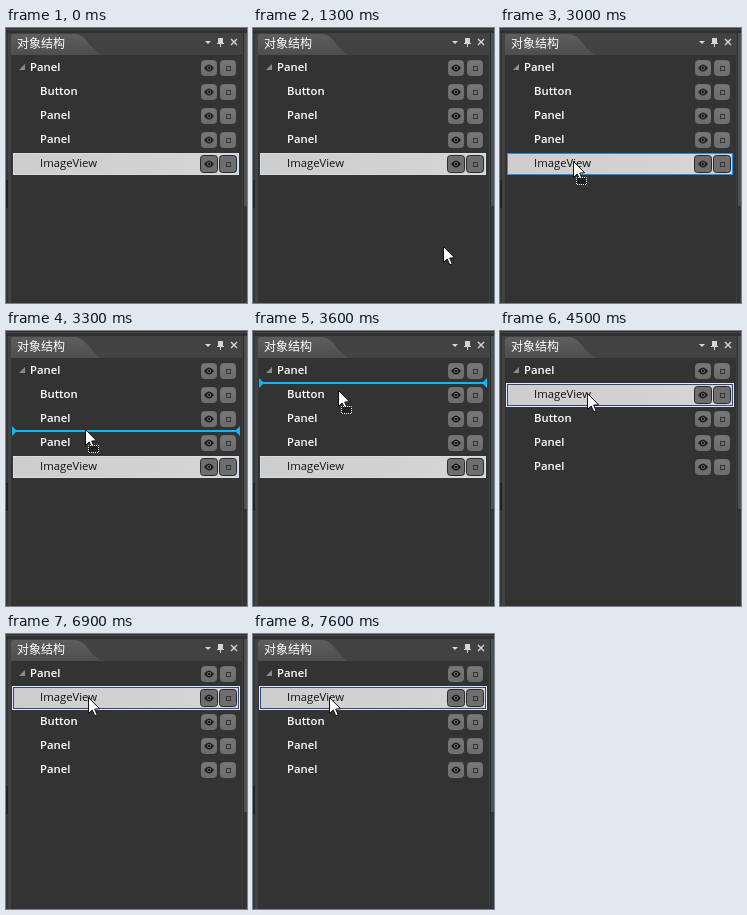
Animation of 241x275 px, one loop 8000 ms. Source, as an HTML page with a canvas:

```html
<!DOCTYPE html>
<html lang="zh">
<head>
<meta charset="utf-8">
<title>对象结构</title>
<style>
html, body { margin: 0; width: 100%; height: 100%; overflow: hidden; background: #333; }
canvas { display: block; width: 241px; height: 275px; }
</style>
</head>
<body>
<canvas id="stage" width="241" height="275"></canvas>
<script>
const ctx = document.getElementById('stage').getContext('2d');
const LOOP = 8000, STEP = 100;
const LEFT = 6, RIGHT = 234, FIRST = 28, ROW = 24;
const DRAG_START = 3000, DROP = 4000, HOVER = 2000;

// time, x, y of the pointer tip
const path = [
  [500, 231, 246], [700, 231, 246], [900, 223, 240], [1000, 223, 240],
  [1300, 190, 218], [1600, 138, 178], [1900, 98, 148], [2000, 88, 146],
  [2300, 75, 135], [2900, 75, 135], [3000, 73, 133], [3300, 79, 98],
  [3600, 85, 59], [4300, 85, 59], [4500, 87, 62], [6200, 87, 62],
  [6300, 93, 63], [6600, 131, 63], [6700, 131, 63], [7100, 32, 63],
  [7300, 32, 63], [7600, 76, 63]
];

function pointerAt(t) {
  if (t < path[0][0]) return null;
  const i = path.findIndex(k => k[0] > t);
  if (i < 0) return path[path.length - 1].slice(1);
  const [t0, x0, y0] = path[i - 1], [t1, x1, y1] = path[i];
  const p = (t - t0) / (t1 - t0);
  return [Math.round(x0 + (x1 - x0) * p), Math.round(y0 + (y1 - y0) * p)];
}

function rect(x, y, w, h, color) {
  ctx.fillStyle = color;
  ctx.fillRect(x, y, w, h);
}

function frame(x, y, w, h, color) {
  ctx.strokeStyle = color;
  ctx.lineWidth = 1;
  ctx.strokeRect(x + .5, y + .5, w - 1, h - 1);
}

function poly(points, fill, stroke) {
  ctx.beginPath();
  points.forEach(([x, y]) => ctx.lineTo(x, y));
  ctx.closePath();
  ctx.fillStyle = fill;
  ctx.fill();
  if (stroke) {
    ctx.strokeStyle = stroke;
    ctx.lineWidth = 1;
    ctx.stroke();
  }
}

function label(text, x, y, color, weight) {
  ctx.font = weight + ' 11.3px "Open Sans", "Noto Sans", sans-serif';
  ctx.fillStyle = color;
  ctx.fillText(text, x, y);
}

function gradient(x0, y0, x1, y1, a, b) {
  const g = ctx.createLinearGradient(x0, y0, x1, y1);
  g.addColorStop(0, a);
  g.addColorStop(1, b);
  return g;
}

function chrome() {
  rect(0, 0, 241, 275, '#424242');
  rect(0, 0, 241, 5, '#303030');
  rect(0, 1, 241, 1, '#454545');
  rect(0, 5, 2, 270, '#383838');
  rect(0, 152, 2, 28, '#222');
  rect(237, 5, 1, 270, '#2a2a2a');
  rect(238, 5, 3, 173, '#525252');
  rect(238, 178, 3, 97, '#363636');
  rect(5, 27, 231, 248, '#333');

  ctx.beginPath();
  ctx.moveTo(5, 27);
  ctx.lineTo(5, 9);
  ctx.quadraticCurveTo(5, 6, 8, 6);
  ctx.lineTo(68, 6);
  ctx.bezierCurveTo(81, 6, 84, 22, 96, 27);
  ctx.closePath();
  ctx.fillStyle = gradient(0, 6, 0, 27, '#5e5e5e', '#4e4e4e');
  ctx.fill();

  ctx.font = '500 12px "Noto Sans CJK SC", "Noto Sans CJK", sans-serif';
  ctx.fillStyle = '#fff';
  ctx.fillText('对象结构', 11, 20);

  const tone = '#d6d6d6';
  poly([[199, 13], [205, 13], [202, 16]], tone);
  rect(212, 10, 5, 5, tone);
  rect(211, 15, 7, 1, tone);
  rect(214, 16, 1, 3, tone);
  ctx.strokeStyle = tone;
  ctx.lineWidth = 1.4;
  ctx.beginPath();
  ctx.moveTo(225, 11); ctx.lineTo(231, 17);
  ctx.moveTo(231, 11); ctx.lineTo(225, 17);
  ctx.stroke();
}

function button(x, y, active) {
  const grow = active ? 1 : 0;
  ctx.beginPath();
  ctx.roundRect(x + .5 - grow, y + .5 - grow, 15 + 2 * grow, 15 + 2 * grow, 3);
  ctx.fillStyle = active ? '#6e6e6e' : gradient(0, y, 0, y + 16, '#787878', '#6c6c6c');
  ctx.fill();
  ctx.strokeStyle = active ? '#2a2a2a' : '#707070';
  ctx.lineWidth = 1;
  ctx.stroke();
}

function rowButtons(mid, active) {
  const y = mid - 7;
  button(195, y, active);
  button(214, y, active);
  const cx = 203, cy = y + 8;
  ctx.beginPath();
  ctx.moveTo(cx - 5, cy);
  ctx.quadraticCurveTo(cx, cy - 7, cx + 5, cy);
  ctx.quadraticCurveTo(cx, cy + 7, cx - 5, cy);
  ctx.fillStyle = '#1c1c1c';
  ctx.fill();
  ctx.beginPath();
  ctx.arc(cx, cy, 2, 0, 7);
  ctx.fillStyle = '#707070';
  ctx.fill();
  rect(cx - 1, cy - 1, 2, 2, '#1c1c1c');
  frame(220, y + 6, 5, 5, '#353535');
}

function selection(y, focused) {
  const x = LEFT + 1, w = RIGHT - LEFT - 2, h = ROW - 2;
  rect(x, y + 1, w, h, gradient(LEFT, 0, RIGHT, 0, '#cdcdcd', '#d6d6d6'));
  if (focused) {
    frame(LEFT, y, w + 2, ROW, '#e4e7fb');
    frame(x, y + 1, w, h, '#34457f');
  } else {
    frame(x, y + 1, w, h, '#d4dcec');
  }
}

function list(t) {
  const names = t < DROP
    ? ['Panel', 'Button', 'Panel', 'Panel', 'ImageView']
    : ['Panel', 'ImageView', 'Button', 'Panel', 'Panel'];
  const focused = t >= HOVER && t < DRAG_START || t >= DROP;
  names.forEach((name, i) => {
    const mid = 39 + i * ROW;
    const selected = name === 'ImageView';
    if (selected) selection(FIRST + i * ROW, focused);
    label(name, i ? 34 : 24, mid + 4, selected ? '#101010' : '#fff', selected ? 400 : 600);
    rowButtons(mid, selected);
  });
  poly([[19, 36], [19, 42], [13, 42]], '#8c8c8c');
}

// Near a row's upper or lower edge the item lands between rows, else inside.
function dropMark(y) {
  const i = Math.floor((y - FIRST) / ROW);
  const top = FIRST + i * ROW, off = y - top;
  if (off > 8 && off < 16) {
    frame(LEFT + 1, top + 1, RIGHT - LEFT - 2, ROW - 2, '#1d8fe6');
    return;
  }
  const line = (off <= 8 ? top : top + ROW) - 1;
  const cyan = '#11b7f5';
  rect(LEFT, line, RIGHT - LEFT, 2, cyan);
  poly([[LEFT, line - 4], [LEFT + 5, line + 1], [LEFT, line + 6]], cyan);
  poly([[RIGHT, line - 4], [RIGHT - 5, line + 1], [RIGHT, line + 6]], cyan);
}

function pointer([x, y], dragging) {
  ctx.save();
  ctx.translate(x + .5, y + .5);
  poly([[0, 0], [0, 16], [3.7, 12.5], [6.3, 18.3], [8.7, 17.2], [6.2, 11.6], [11, 11.2]],
    '#fff', '#111');
  if (dragging) {
    rect(3, 16, 10, 7, '#222');
    ctx.setLineDash([1, 1]);
    ctx.lineDashOffset = .5;
    ctx.strokeStyle = '#fff';
    ctx.lineWidth = 1;
    ctx.strokeRect(3, 16, 10, 7);
  }
  ctx.restore();
}

function draw(now) {
  const t = Math.floor(now % LOOP / STEP) * STEP;
  const tip = pointerAt(t);
  const dragging = t >= DRAG_START && t < DROP;
  chrome();
  list(t);
  if (dragging) dropMark(tip[1]);
  if (tip) pointer(tip, dragging);
}

const start = performance.now();
function tick() {
  draw(performance.now() - start);
  requestAnimationFrame(tick);
}
tick();
</script>
</body>
</html>
```
